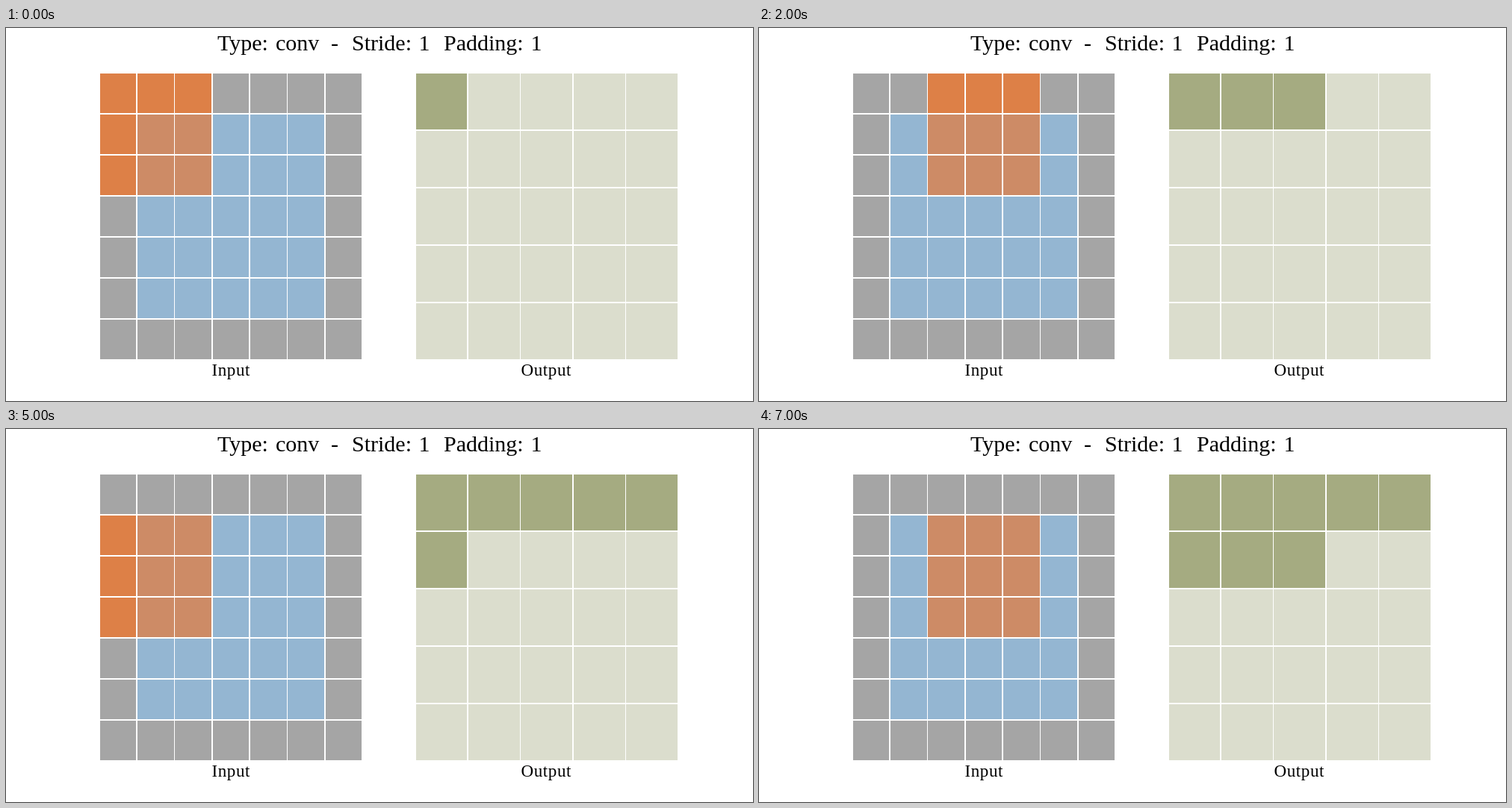
Animation of 1000 by 500 pixels, one loop 8 s. Source, as an HTML page:

```html
<!DOCTYPE html>
<html lang="en">
<head>
<meta charset="utf-8">
<title>Convolution</title>
<style>
  html, body { margin: 0; width: 100%; height: 100%; overflow: hidden; background: #fff; }
  svg { display: block; width: 1000px; height: 500px; }
  rect { shape-rendering: crispEdges; }
  text { font-family: "Liberation Serif", serif; fill: #000; }
  .title { font-size: 30px; }
  .label { font-size: 23px; letter-spacing: .6px; text-anchor: middle; }
  .pad { fill: #a5a5a5; }
  .data { fill: #94b6d2; }
  .out { fill: #dbddcd; }
  .done { fill: #a5ab81; }
  .lines { fill: #fff; }
  .kernel { animation: slide 8s step-end infinite; }
  .row1 { animation: fill1 8s step-end infinite; }
  .row2 { animation: fill2 8s step-end infinite; }

  @keyframes slide {
    0% { transform: translate(0, 0); }
    12.5% { transform: translate(50px, 0); }
    25% { transform: translate(100px, 0); }
    37.5% { transform: translate(151px, 0); }
    50% { transform: translate(201px, 0); }
    62.5% { transform: translate(0, 55px); }
    75% { transform: translate(50px, 55px); }
    87.5%, 100% { transform: translate(100px, 55px); }
  }
  @keyframes fill1 {
    0% { width: 68px; }
    12.5% { width: 139px; }
    25% { width: 209px; }
    37.5% { width: 280px; }
    50%, 100% { width: 350px; }
  }
  @keyframes fill2 {
    0% { width: 0; }
    62.5% { width: 68px; }
    75% { width: 139px; }
    87.5%, 100% { width: 209px; }
  }
</style>
</head>
<body>
<svg viewBox="0 0 1000 500">
  <defs>
    <clipPath id="panel"><rect x="126" y="61" width="350" height="383"/></clipPath>
    <clipPath id="inner"><rect x="176" y="116" width="250" height="273"/></clipPath>
  </defs>

  <g class="title">
    <text x="283" y="30">Type:</text>
    <text x="361" y="30">conv</text>
    <text x="435" y="30">-</text>
    <text x="463" y="30">Stride:</text>
    <text x="552.5" y="30">1</text>
    <text x="586" y="30">Padding:</text>
    <text x="702.5" y="30">1</text>
  </g>

  <rect class="pad" x="126" y="61" width="350" height="383"/>
  <rect class="data" x="176" y="116" width="250" height="273"/>
  <g clip-path="url(#panel)">
    <rect class="kernel" x="126" y="61" width="150" height="163" fill="#dd8047"/>
  </g>
  <g clip-path="url(#inner)">
    <rect class="kernel" x="126" y="61" width="150" height="163" fill="#cd8b66"/>
  </g>

  <rect class="out" x="549" y="61" width="350" height="383"/>
  <rect class="done row1" x="549" y="61" height="75"/>
  <rect class="done row2" x="549" y="138" height="75"/>

  <g class="lines" id="lines"></g>

  <text class="label" x="301.3" y="466">Input</text>
  <text class="label" x="723.3" y="466">Output</text>
</svg>
<script>
  const lines = document.getElementById('lines');

  function bar(x, y, width, height) {
    const el = document.createElementNS('http://www.w3.org/2000/svg', 'rect');
    const box = { x, y, width, height };
    for (const key in box) el.setAttribute(key, box[key]);
    lines.append(el);
  }

  // Each column gap is [left edge, thickness]; row gaps are evenly spaced.
  function grid(left, columns, pitch) {
    for (const [x, w] of columns) bar(x, 61, w, 383);
    for (let y = 59 + pitch; y < 440; y += pitch) bar(left, y, 350, 2);
  }

  grid(126, [[174, 2], [225, 1], [275, 2], [325, 2], [376, 1], [426, 2]], 55);
  grid(549, [[617, 2], [688, 1], [758, 2], [829, 1]], 77);
</script>
</body>
</html>
```
